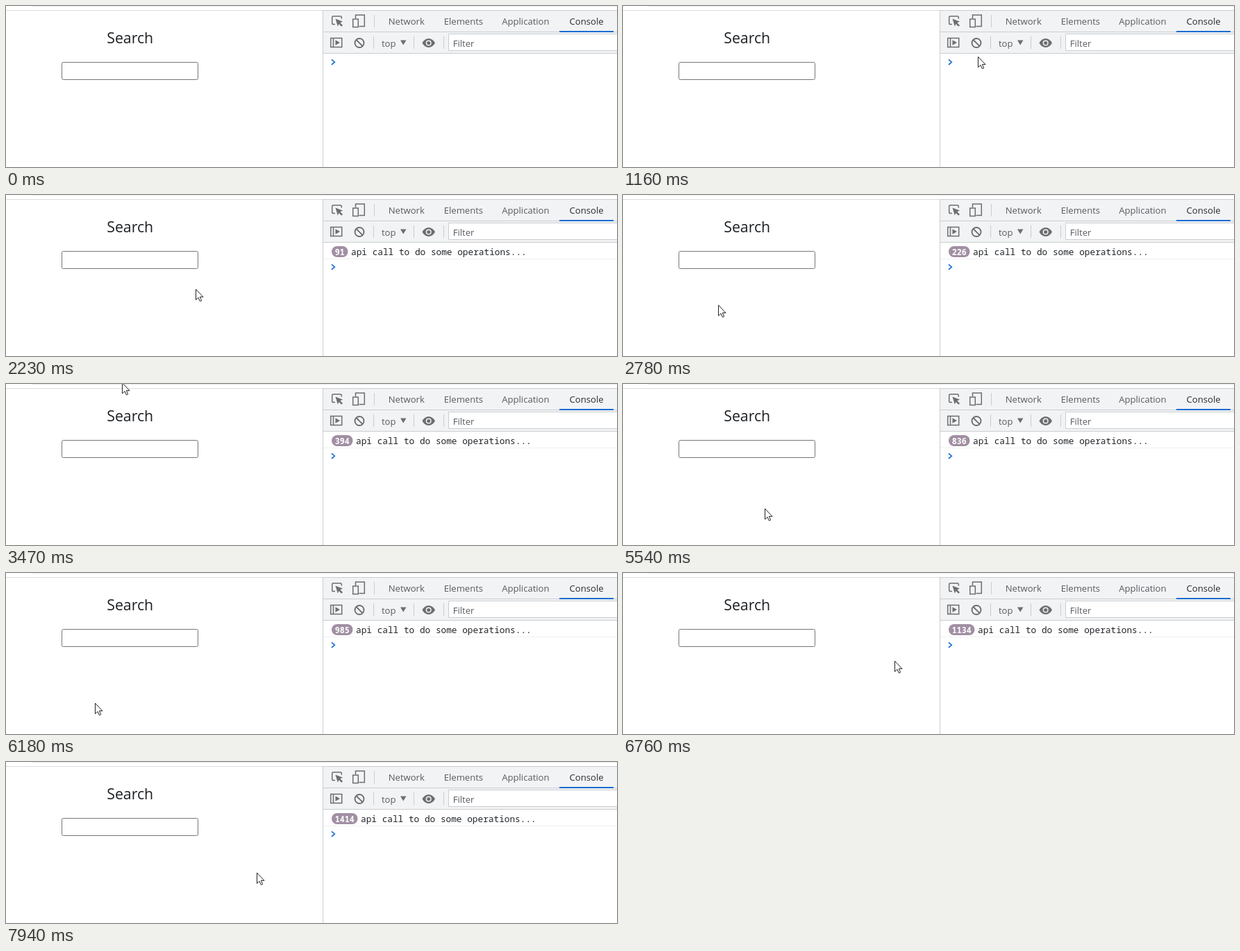
An HTML page that plays this animation: 880 px wide and 233 px high, repeating every 8000 ms.

```html
<!DOCTYPE html>
<html lang="en">
<head>
<meta charset="utf-8">
<title>Search events</title>
<style>
  html, body { margin: 0; width: 100%; height: 100%; overflow: hidden; background: #fff; }
  svg { display: block; width: 880px; height: 233px; }
  text { font-family: "Open Sans", "Noto Sans", sans-serif; font-size: 13.1px; fill: #585c61; white-space: pre; }
  .title { font-size: 21.3px; fill: #1d2125; }
  .mono { font-family: "Noto Sans Mono", "DejaVu Sans Mono", monospace; font-size: 12.77px; fill: #202428; }
  .count { font-size: 11.7px; font-weight: 700; fill: #fff; text-anchor: middle; }
  .icon { fill: none; stroke: #6e6e6e; stroke-width: 1.5; }
  .bold { stroke-width: 1.9; }
  .solid { fill: #6e6e6e; }
  .rule { stroke: #cacdd1; fill: none; }
</style>
</head>
<body>
<svg viewBox="0 0 880 233">
  <!-- page -->
  <path d="M37 .5H880" stroke="#ececec"/>
  <path d="M0 6.5H456" stroke="#dcdcdc"/>
  <text class="title" x="145.2" y="53.5">Search</text>
  <rect x="80.5" y="81.5" width="196" height="25" rx="2" fill="#fff" stroke="#767676"/>

  <!-- developer tools -->
  <rect x="456" y="6" width="424" height="62" fill="#f1f3f4"/>
  <path class="rule" d="M456 6.5H880M456.5 6V233M456 37.5H880M456 68.5H880M530.5 13V31M529.5 44V62M587.5 44V62M630.5 44V62"/>
  <rect x="797" y="36" width="78" height="2" fill="#1a6dd0"/>
  <text x="550.7" y="27">Network</text>
  <text x="630.7" y="27">Elements</text>
  <text x="714.2" y="27">Application</text>
  <text x="811.6" y="27" style="fill:#2b2b2b">Console</text>

  <path class="icon" d="M474 26.5H471.5Q469.7 26.5 469.7 24.7V16.5Q469.7 14.7 471.5 14.7H481.5Q483.3 14.7 483.3 16.5V18.5"/>
  <path class="solid" d="M474.5 18.5L485 22.5L481.3 24.3L485 28L483.2 29.8L479.5 26.1L477.8 29.5Z"/>
  <path class="icon" d="M503.5 18V13H516.3V29.5H508.5"/>
  <rect class="icon" x="499.7" y="19" width="7.6" height="11.5"/>

  <rect class="icon" x="467.7" y="46.5" width="16" height="13"/>
  <path class="icon" d="M471.5 46.5V59.5"/>
  <path class="solid" d="M474.5 49.3L481 53L474.5 56.7Z"/>
  <circle class="icon bold" cx="509" cy="53.5" r="6.5"/>
  <path class="icon bold" d="M504.5 49L513.5 58"/>
  <text x="541" y="58.5">top</text>
  <path class="solid" d="M568 49.5H576.5L572.2 56.5Z"/>
  <path class="solid" d="M599.5 53.5Q603 47 608.7 47T618 53.5Q614.5 60 608.7 60T599.5 53.5Z"/>
  <circle cx="608.7" cy="53.5" r="3.3" fill="none" stroke="#f1f3f4" stroke-width="1.5"/>
  <path d="M880 40.5H637.5V64.5H880" fill="#fff" stroke="#cacdd1"/>
  <text x="643.7" y="59">Filter</text>

  <!-- console -->
  <g id="message">
    <path d="M457 92.5H880" stroke="#f0f0f0"/>
    <rect id="badge" x="469" y="74" height="16" rx="8" fill="#a18fa3"/>
    <text id="count" class="mono count" y="86.500"></text>
    <text id="label" class="mono" y="87">api call to do some operations...</text>
  </g>
  <path id="prompt" d="M469 77.5L473.3 81.2L469 85" fill="none" stroke="#2474d2" stroke-width="1.7"/>
  <path id="pointer" d="M.5 .5V15.8L4 12.5L6.4 17.8L8.7 16.8L6.4 11.6H11Z" fill="#fff" stroke="#222"/>
</svg>
<script>
const LOOP = 8000, ENTER = 550, LEAVE = 1820, STEP = 68.8;

// Turning points [time, value]; each axis swings between its own extremes.
const swingX = [
  [ENTER, 800], [1290, 491], [LEAVE, 491], [2620, 76], [3100, 312], [3740, 80],
  [5086, 450], [5870, 49], [6760, 391], [7400, 120], [7940, 361]
];
const swingY = [
  [ENTER, 179], [1290, 66], [LEAVE, 66], [2300, 140], [2560, 100], [2880, 175], [3540, -7],
  [3950, 160], [4640, 139], [5540, 180], [5830, 127], [6250, 197], [6760, 127], [7250, 218], [7940, 160]
];
const calls = [[1863, 0], [3470, 394], [5535, 836], [7940, 1414]];

const el = id => document.getElementById(id);
const shift = (node, x, y) => node.setAttribute("transform", `translate(${x} ${y})`);
const linear = u => u;
const swing = u => (1 - Math.cos(Math.PI * u)) / 2;

function valueAt(points, t, ease) {
  const next = points.findIndex(([time]) => time > t);
  if (next < 0) return Math.round(points.at(-1)[1]);
  const [t0, a] = points[Math.max(0, next - 1)], [t1, b] = points[next];
  return Math.round(next ? a + (b - a) * ease((t - t0) / (t1 - t0)) : b);
}

function snap(t) {
  const start = t < LEAVE ? ENTER : LEAVE;
  return start + STEP * Math.floor((t - start) / STEP + 0.25);
}

function draw(time) {
  const t = snap(time), visible = time >= ENTER, logged = t > calls[0][0];
  el("pointer").style.display = visible ? "" : "none";
  el("message").style.display = logged ? "" : "none";
  shift(el("prompt"), 0, logged ? 23 : 0);
  shift(el("pointer"), valueAt(swingX, t, swing), valueAt(swingY, t, swing));

  const text = String(valueAt(calls, t, linear));
  const width = 9.5 + 7 * text.length;
  el("count").textContent = text;
  el("count").setAttribute("x", 469 + width / 2);
  el("badge").setAttribute("width", width);
  el("label").setAttribute("x", 483 + 7 * text.length);
}

const began = performance.now();
function tick() {
  draw((performance.now() - began) % LOOP);
  requestAnimationFrame(tick);
}
tick();
</script>
</body>
</html>
```
